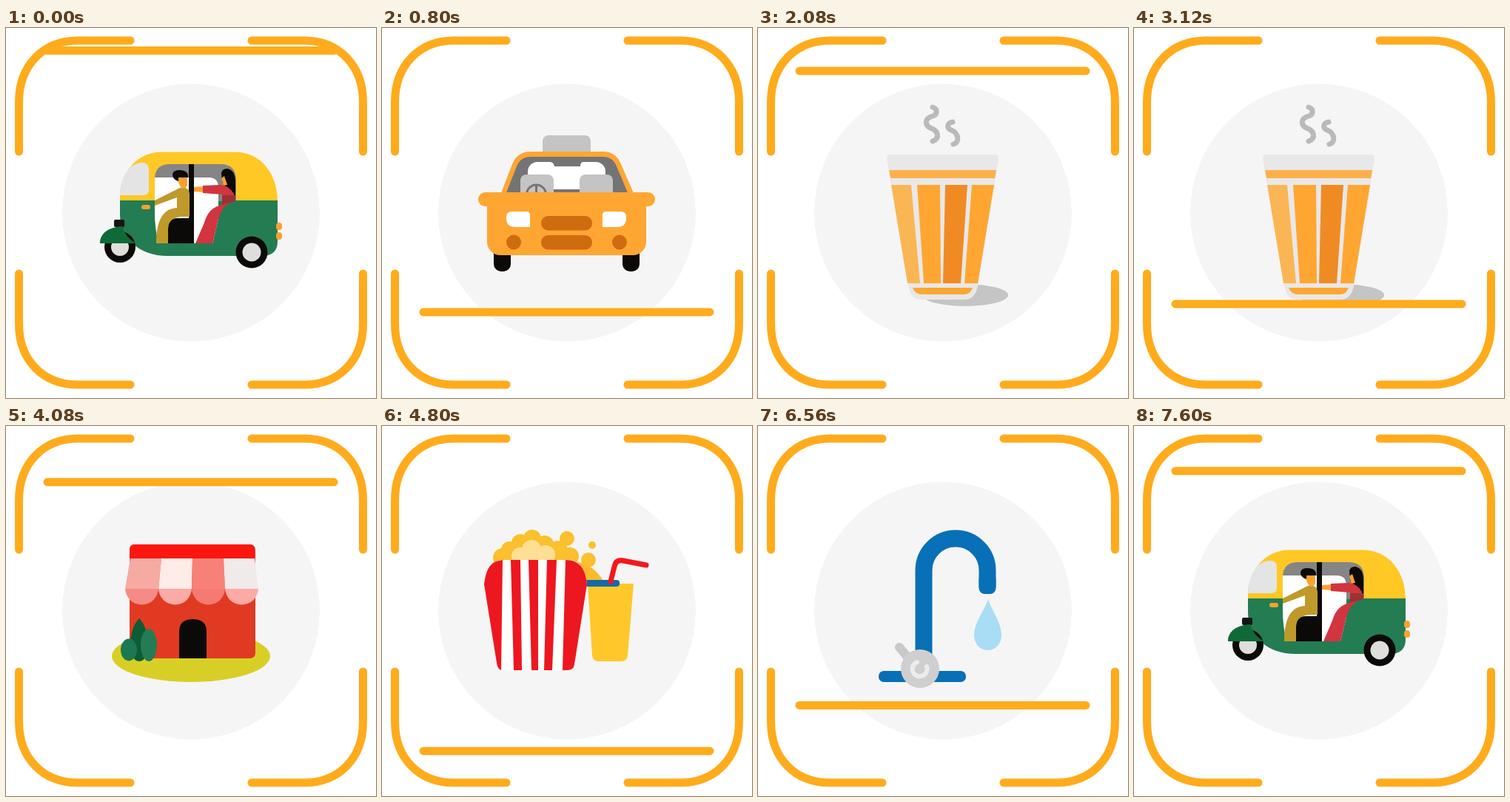
These frames come from a looping animation (500 px wide and 500 px high, 7680 ms). An HTML page:

```html
<!DOCTYPE html>
<html lang="en">
<head>
<meta charset="utf-8">
<title>Scanner</title>
<style>
html, body { margin: 0; width: 100%; height: 100%; overflow: hidden; background: #fff; }
svg { position: absolute; left: 0; top: 0; width: 500px; height: 500px; }
.icon { visibility: hidden; }
.frame { fill: none; stroke: #ffab1c; stroke-width: 11; stroke-linecap: round; }
.round { fill: none; stroke-linecap: round; stroke-linejoin: round; }
</style>
</head>
<body>
<svg viewBox="0 0 500 500"><circle cx="250" cy="249.5" r="174" fill="#f5f5f5"/></svg>

<svg class="icon" id="rickshaw" viewBox="0 0 500 500">
  <path d="M154 236V222C157 194 178 167.500 210 167.500H309C342 167.500 367 194 367 236Z" fill="#ffc824"/>
  <path d="M154 233H367V288Q367 308 346 308H218C180 308 154 284 154 252Z" fill="#247c53"/>
  <path d="M154 226C154 202 167 182 184 182Q193 182 193 191V219Q193 226 185 226Z" fill="#e4e4e4"/>
  <path d="M201 216V203Q202 184 221 184H290Q311 184 311 206V234H201Z" fill="#858585"/>
  <path d="M201 202H274Q287 202 287 216V291H206Q201 270 201 250Z" fill="#fff"/>
  <path d="M279 291L286 262Q291 239 311 233V291Z" fill="#247c53"/>
  <path d="M219 291V270Q219 257 232 257H254V291Z" fill="#0c0a09"/>
  <path d="M247 184H254V291H247Z" fill="#0c0a09"/>
  <path d="M203 291C203 262 211 244 231 243V229L201 240V233L235 216Q248 214 248 224V255H238Q219 256 219 272V291Z" fill="#c0992b"/>
  <path d="M232 201H245V212Q244 217 238 217Q232 211 232 201Z" fill="#fba12e"/>
  <path d="M225 199Q225 192 234 192Q247 192 246 202H233V207Q226 205 225 199Z" fill="#0c0a09"/>
  <path d="M291 196Q292 190 299 190Q310 192 310 208V229H301L292 207Z" fill="#0c0a09"/>
  <path d="M291 203L295 200L299 212L294 213Z" fill="#fba12e"/>
  <path d="M254 215L269 214V222L254 221Z" fill="#fba12e"/>
  <path d="M266 213L290 212Q300 212 308 224V234Q291 239 286 262L279 291H256L268 263Q274 242 292 239V225L266 223Z" fill="#d2353f"/>
  <path d="M292 226H310V234L292 239Z" fill="#9f3032"/>
  <rect x="183" y="239" width="12" height="6" rx="3" fill="#fba12e"/>
  <rect x="146" y="259" width="14" height="10" rx="2" fill="#171512"/>
  <rect x="365" y="263" width="8" height="10" rx="4" fill="#fba12e"/>
  <rect x="365" y="276" width="8" height="10" rx="4" fill="#fba12e"/>
  <g fill="#0c0a09"><circle cx="154" cy="296" r="21"/><circle cx="332" cy="303" r="21.500"/></g>
  <g fill="#e0dedc"><circle cx="154" cy="296" r="12"/><circle cx="332" cy="303" r="12.500"/></g>
  <path d="M127 291C127 278 138 269 157 268Q162 284 176 291Z" fill="#0f6a38"/>
</svg>

<svg class="icon" id="car" viewBox="0 0 500 500">
  <g fill="#0c0a09"><rect x="151" y="290" width="23" height="39" rx="10"/><rect x="325" y="290" width="23" height="39" rx="10"/></g>
  <rect x="217" y="145" width="65" height="32" rx="8" fill="#c4c4c4"/>
  <path d="M159 228L176 184Q183 167 201 167H299Q316 167 323 184L342 228Z" fill="#ffa632"/>
  <path d="M167 225L182 187Q187 174 201 174H298Q312 174 317 187L333 225Z" fill="#747476"/>
  <rect x="197" y="181" width="105" height="37" rx="13" fill="#fff"/>
  <path d="M227 174H272V181Q268 181 268 187H233Q232 181 227 181Z" fill="#747476"/>
  <g fill="#c4c4c4"><rect x="187" y="198" width="45" height="35" rx="8"/><rect x="267" y="198" width="45" height="35" rx="8"/></g>
  <path d="M208.500 212V226M198 224H219" stroke="#747476" stroke-width="3"/>
  <circle cx="208.500" cy="225" r="13" fill="none" stroke="#747476" stroke-width="3"/>
  <g fill="#ffa632"><rect x="130" y="222" width="239" height="19" rx="9.500"/><rect x="142" y="224" width="215" height="83" rx="18"/></g>
  <path d="M168 255Q168 248 176 248H195Q200 248 200 253V269H180Q168 269 168 257ZM330 255Q330 248 322 248H303Q298 248 298 253V269H318Q330 269 330 257Z" fill="#fff"/>
  <g fill="#cf6c10">
    <rect x="215" y="254" width="69" height="19.500" rx="9.500"/><rect x="215" y="280" width="69" height="19.500" rx="9.500"/>
    <circle cx="178" cy="289.500" r="10"/><circle cx="321" cy="289.500" r="10"/>
  </g>
</svg>

<svg class="icon" id="tea" viewBox="0 0 500 500">
  <ellipse cx="280" cy="361" rx="58" ry="15" fill="#c5c5c5"/>
  <path d="M174 177Q174 171 180 171H320Q326 171 325 178L297 349Q293 367 279 367H220Q207 367 203 349Z" fill="#e8e8e8"/>
  <path d="M177 192H322L320 203H179Z" fill="#fdb04a"/>
  <path d="M180 212H207L219 345H202Z" fill="#fab654"/>
  <path d="M215 212H246L247 345H224ZM289 212H319L297 345H279Z" fill="#ffa632"/>
  <path d="M253 212H283L274 345H250Z" fill="#f08b24"/>
  <path d="M209 351H290Q287 360 278 360H222Q212 360 209 351Z" fill="#ffa632"/>
  <path class="round" d="M236 107C243 109 243 117 236 119C225 122 225 131 233 135C244 139 246 149 236 153M263 127C256 128 254 135 261 138C270 141 274 154 264 157" stroke="#bababa" stroke-width="7"/>
</svg>

<svg class="icon" id="shop" viewBox="0 0 500 500">
  <ellipse cx="250" cy="311" rx="107" ry="35" fill="#d8cf26"/>
  <rect x="167" y="160" width="170" height="154" rx="7" fill="#e03b22"/>
  <path d="M167 180V167Q167 160 174 160H329Q336 160 336 167V180Z" fill="#fb170f"/>
  <g id="awning"></g>
  <path d="M234 314V278Q234 261 252.500 261Q271 261 271 278V314Z" fill="#0c0a09"/>
  <path d="M180 260C196 276 196 318 180 318C164 318 164 276 180 260Z" fill="#0c5c36"/>
  <ellipse cx="166" cy="302.500" rx="11" ry="15" fill="#1c7850"/>
  <ellipse cx="193" cy="296" rx="11" ry="22" fill="#247c55"/>
</svg>

<svg class="icon" id="snacks" viewBox="0 0 500 500">
  <path d="M255 182C278 184 294 196 302 216H250Z" fill="#fdb92e"/>
  <path d="M278 213H340L332 310Q331 318 323 318H293Q285 318 284 310Z" fill="#ffc82a"/>
  <rect x="272" y="208" width="49" height="9" rx="4" fill="#1769a5"/>
  <path class="round" d="M309 210L314 190Q316 180 326 182L357 188" stroke="#f5171b" stroke-width="7"/>
  <g fill="#fbc02d">
    <circle cx="250" cy="152" r="10"/><circle cx="284" cy="161" r="5"/><circle cx="279" cy="181" r="10"/>
    <circle cx="163" cy="178" r="13"/><circle cx="172" cy="167" r="11"/><circle cx="187" cy="158" r="12"/>
    <circle cx="203" cy="152" r="12"/><circle cx="220" cy="160" r="12"/><circle cx="238" cy="168" r="13"/><circle cx="254" cy="176" r="12"/>
    <path d="M160 168H256V195H160Z"/>
  </g>
  <g fill="#ffdf94"><circle cx="187" cy="176" r="12"/><circle cx="202" cy="167" r="13"/><circle cx="221" cy="174" r="13"/><path d="M178 175H230V184H178Z"/></g>
  <path d="M138 214C140 192 149 181 164 181H252C267 181 275 194 277 214L260 322Q259 330 250 330H166Q157 330 156 322Z" fill="#fff"/>
  <path d="M138 214C140 196 145 187 154 183L163 181L161 330Q156 328 155 320ZM174 181H187L189 330H178ZM198 181H211V330H202ZM223 181H236L230 330H219ZM248 181C268 181 275 194 277 214L260 322Q259 330 250 330H244Z" fill="#ed1720"/>
</svg>

<svg class="icon" id="parcel" viewBox="0 0 500 500">
  <rect x="230" y="200" width="128" height="73" rx="9" fill="#ffc82a"/>
  <path d="M141 242Q141 232 147 228L217 275V356Q209 356 202 352L152 325Q141 318 141 305Z" fill="#ffa632"/>
  <path d="M292 242Q292 232 286 228L217 275V356Q225 356 232 352L281 322Q292 314 292 300Z" fill="#c96b12"/>
  <path d="M145 231Q148 225 156 221L205 195Q217 189 229 195L278 221Q286 225 289 231L217 275Z" fill="#df861b"/>
  <path d="M228 281L254 268Q258 266 258 271V284Q258 289 254 291L228 303Q224 305 224 300V288Q224 283 228 281Z" fill="#ffc82a"/>
  <path class="round" d="M227 315L254 300M227 326L254 311" stroke="#0c0a09" stroke-width="5"/>
</svg>

<svg class="icon" id="tap" viewBox="0 0 500 500">
  <path d="M224 315V195A43 43 0 0 1 310 195V218" fill="none" stroke="#0870b6" stroke-width="23"/>
  <rect x="298.500" y="200" width="23" height="27" rx="8" fill="#0870b6"/>
  <rect x="163" y="331" width="118" height="15" rx="7" fill="#0870b6"/>
  <path class="round" d="M191 299L208 319" stroke="#c9c9c9" stroke-width="12"/>
  <circle cx="219" cy="328" r="26" fill="#cfcfcf"/>
  <path class="round" d="M215 319A10 10 0 1 0 228 325" stroke="#ececec" stroke-width="6"/>
  <path d="M311 234C316 250 329 265 329 283A18.500 20 0 0 1 292 283C292 265 306 250 311 234Z" fill="#a9dcf5"/>
</svg>

<svg class="frame" viewBox="0 0 500 500">
  <path d="M17.500 167V100C17.500 51 50 17 97 17H168M332 17H403C450 17 482.500 51 482.500 100V167M482.500 332V400C482.500 449 450 482 403 482H332M168 482H97C50 482 17.500 449 17.500 400V332"/>
  <path id="beam" d="M56 0H443"/>
</svg>

<script>
const LOOP = 7680, STEP = 80, TOP = 12, BOTTOM = 476;
// Times at which the beam turns, alternating top and bottom.
const turns = [125, 1081, 1890, 2821, 3778, 5027, 5945, 6830, 7805];
// The icon revealed by each sweep replaces the one before it.
const order = ['rickshaw', 'car', 'tea', 'tea', 'shop', 'snacks', 'parcel', 'tap', 'rickshaw'];
const byId = id => document.getElementById(id);
const icons = document.querySelectorAll('.icon');
const beam = byId('beam');

const cloth = ['#f5aaa2', '#feece9', '#f78178', '#f1eaea'];
const hem = ['#f68a86', '#fbaaa6', '#f67a72', '#fbaaa6'];
byId('awning').innerHTML = cloth.map((color, i) => {
  const a = 168 + 42 * i, b = 161 + 45 * i;
  return `<path d="M${b} 219H${b + 45}A22.5 22.5 0 0 1 ${b} 219Z" fill="${hem[i]}"/>` +
    `<path d="M${a} 179H${a + 42}L${b + 45} 220H${b}Z" fill="${color}"/>`;
}).join('');

function show(id, from, to) {
  const style = byId(id).style;
  style.visibility = 'visible';
  style.clipPath = `inset(${from}px 0 ${500 - to}px 0)`;
}

function draw(now) {
  let t = Math.floor(now % LOOP / STEP) * STEP;
  if (t < turns[0]) t += LOOP;
  const i = turns.findIndex(end => t < end) - 1;
  const p = (t - turns[i]) / (turns[i + 1] - turns[i]);
  const ease = (1 - Math.cos(Math.PI * p)) / 2;
  const down = i % 2 === 0;
  const y = TOP + (BOTTOM - TOP) * (down ? ease : 1 - ease);
  const [before, after] = [order[i], order[i + 1]];

  icons.forEach(icon => icon.style.visibility = 'hidden');
  if (before === after) {
    show(after, 0, 500);
  } else {
    show(down ? after : before, 0, y);
    show(down ? before : after, y, 500);
  }
  beam.setAttribute('transform', `translate(0 ${y.toFixed(1)})`);
}

const start = performance.now();
function tick() {
  draw(performance.now() - start);
  requestAnimationFrame(tick);
}
tick();
</script>
</body>
</html>
```
